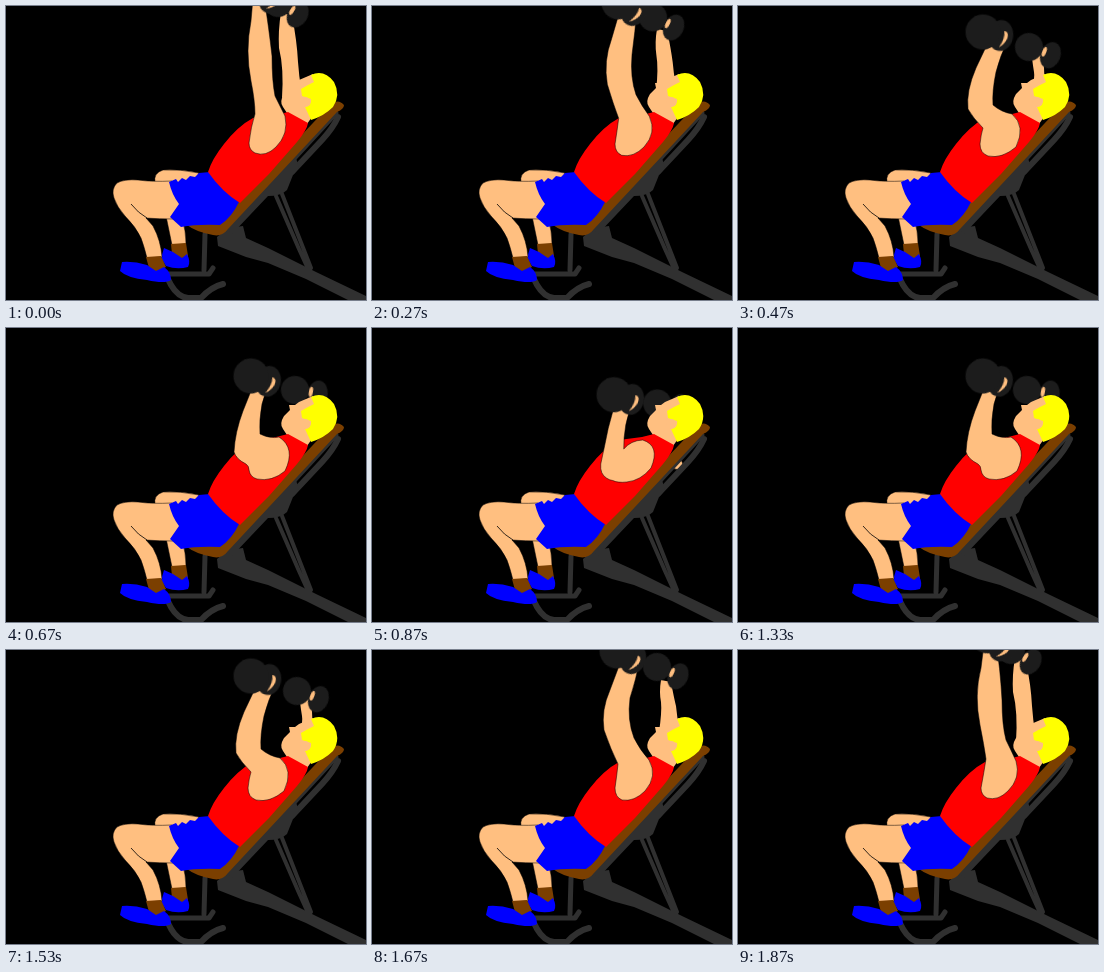
An HTML page without scripts that plays this animation: 360 px wide and 294 px high, repeating every 1.94 s.

```html
<!DOCTYPE html>
<html lang="en">
<head>
<meta charset="utf-8">
<title>Incline dumbbell press</title>
<style>
html, body { margin: 0; width: 100%; height: 100%; overflow: hidden; background: #000; }
svg { display: block; width: 100vw; height: 100vh; }
.skin { fill: #ffbf80; }
.blue { fill: #00f; }
.brown { fill: #7b3f00; }
.line { stroke: #000; stroke-width: .5; stroke-linejoin: round; }
.bar { fill: none; stroke: #303030; stroke-linecap: round; stroke-linejoin: round; }
.steel { fill: #303030; }

/* Poses: a top, b just below, c high, d middle, e low, f bottom */
.near.arm {
  --a: path("M243 137 Q245 120 249 108 Q249 95 245 75 Q239 45 245 15 L247 -8 L258 -8 Q262 15 266 50 Q266 75 269 90 Q273 98 279 110 Q283 128 270 141 Q260 151 249 147 Q243 144 243 137Z");
  --b: path("M243 138 Q246 122 248 109 Q246 95 242 75 Q236 45 243 18 L246 -6 L258 -6 Q262 15 264 50 Q264 75 268 90 Q272 98 278 111 Q283 128 270 141 Q260 151 249 148 Q243 145 243 138Z");
  --c: path("M243 138 Q245 124 246 114 Q239 100 232 80 Q229 60 238 40 L247 16 L268 8 Q264 30 258 48 Q255 70 262 88 Q268 100 277 110 Q286 126 273 141 Q262 152 250 150 Q243 147 243 138Z");
  --d: path("M242 138 Q243 128 245 122 Q235 112 230 103 Q228 85 238 62 L247 43 L270 34 Q262 50 258 66 Q254 85 255 99 Q263 106 274 108 Q288 120 278 141 Q264 153 250 150 Q242 147 242 138Z");
  --e: path("M243 142 Q243 138 240 136 Q230 131 228 124 Q229 104 237 83 L245 63 L265 54 Q259 64 256 76 Q253 92 254 106 Q264 111 273 109 Q290 120 279 143 Q266 154 251 151 Q244 149 243 142Z");
  --f: path("M240 156 Q236 157 233 155 Q227 151 229 140 Q234 122 236 106 L240 88 L260 82 Q255 92 253 104 Q251 116 251 126 Q257 113 270 113 Q288 117 279 139 Q270 152 256 155 Q246 157 240 156Z");
}
.far.arm {
  --a: path("M276 92 Q278 62 273 42 Q272 25 275 6 L286 10 Q291 35 292 56 Q293 70 295 82Z");
  --b: path("M278 92 Q280 62 275 42 Q274 25 277 8 L288 12 Q293 35 294 56 Q295 70 297 82Z");
  --c: path("M287 82 Q290 62 289 52 Q287 42 289 30 L299 32 Q302 48 304 56 Q305 66 307 78Z");
  --d: path("M294 82 Q297 72 296 66 Q295 60 294 52 L307 46 Q307 54 306 60 Q306 66 307 78Z");
  --e: path("M298 84 Q302 78 303 74 Q304 70 304 64 L309 62 Q309 66 309 70 Q309 74 309 80Z");
  --f: path("M285 90 Q288 86 288 84 Q286 80 286 78 L290 76 Q294 80 296 84 Q300 88 304 90Z");
}
.near.weight {
  --a: translate(252px, -18px) rotate(33deg);
  --b: translate(250px, -14px) rotate(33deg);
  --c: translate(245px, 1px) rotate(23deg);
  --d: translate(245px, 26px) rotate(8deg);
  --e: translate(245px, 48px) rotate(14deg);
  --f: translate(241px, 73px) rotate(11deg);
}
.far.weight {
  --a: translate(272px, -3px) rotate(31deg);
  --b: translate(273px, 0px) rotate(31deg);
  --c: translate(285px, 17px) rotate(24deg);
  --d: translate(291px, 41px) rotate(21deg);
  --e: translate(289px, 62px) rotate(10deg);
  --f: translate(284px, 80px) rotate(10deg);
}
.elbow {
  --a: translate(290px, 122px);
  --b: var(--a); --c: var(--a); --d: var(--a); --e: var(--a);
  --f: translate(310px, 141px);
}
.arm { d: var(--a); animation: bend 1940ms -5ms infinite; }
.weight, .elbow { transform: var(--a); animation: lift 1940ms -5ms infinite; }
.bell { fill: #1c1c1c; animation: shade 1940ms -5ms step-end infinite; }

/* Fifteen poses a second */
@keyframes bend {
  0% { d: var(--a); animation-timing-function: steps(2); }
  6.873% { d: var(--b); animation-timing-function: steps(3); }
  17.182% { d: var(--c); animation-timing-function: steps(2); }
  24.055% { d: var(--d); animation-timing-function: steps(3); }
  34.364% { d: var(--e); animation-timing-function: steps(4); }
  48.11% { d: var(--f); animation-timing-function: steps(2); }
  54.983% { d: var(--f); animation-timing-function: steps(4); }
  68.729% { d: var(--e); animation-timing-function: steps(3); }
  79.038% { d: var(--d); animation-timing-function: steps(2); }
  85.911% { d: var(--c); animation-timing-function: steps(3); }
  96.22% { d: var(--b); animation-timing-function: steps(1); }
  100% { d: var(--a); }
}
@keyframes lift {
  0% { transform: var(--a); animation-timing-function: steps(2); }
  6.873% { transform: var(--b); animation-timing-function: steps(3); }
  17.182% { transform: var(--c); animation-timing-function: steps(2); }
  24.055% { transform: var(--d); animation-timing-function: steps(3); }
  34.364% { transform: var(--e); animation-timing-function: steps(4); }
  48.11% { transform: var(--f); animation-timing-function: steps(2); }
  54.983% { transform: var(--f); animation-timing-function: steps(4); }
  68.729% { transform: var(--e); animation-timing-function: steps(3); }
  79.038% { transform: var(--d); animation-timing-function: steps(2); }
  85.911% { transform: var(--c); animation-timing-function: steps(3); }
  96.22% { transform: var(--b); animation-timing-function: steps(1); }
  100% { transform: var(--a); }
}
@keyframes shade {
  48.11% { fill: #303030; }
  58.42% { fill: #1c1c1c; }
}
</style>
</head>
<body>
<svg viewBox="0 0 360 294">
  <rect width="360" height="294"/>
  <ellipse class="skin elbow" rx="5.5" ry="5"/>

  <g id="bench">
    <path class="bar" stroke-width="4" d="M270 190 L293 243 L303 265 M276 188 L305 262 L303 265"/>
    <path class="bar" stroke-width="5" d="M199 228 L198 264 M160 268 H203 L207 262"/>
    <path class="bar" stroke-width="6" d="M160 269 L165 279 Q172 291 182 292 L195 292 Q205 281 217 278"/>
    <path class="steel" d="M211 231 L222 222 L237 220 L240 232 L262 242 L310 266 L360 290 V294 H342 L300 273 L262 257 L240 251 L212 240Z"/>
    <path class="bar" stroke-width="6" d="M332 111 Q327 122 316 134 L286 166"/>
    <path class="bar" stroke-width="5" d="M330 107 L222 224"/>
    <path class="steel" d="M290 152 L293 162 L287 169 L281 184 Q275 190 262 190 L226 228 L220 222Z"/>
    <path class="brown" d="M324 99 Q332 92 338 99 Q338 103 331 106 L222 223 Q216 231 207 229 Q190 226 181 219 L214 216 L234 194Z"/>
  </g>

  <g id="legs">
    <path class="skin line" d="M160 210 L166 239 L180 238 Q180 225 176 212Z"/>
    <path class="brown" d="M165 238 L180 237 L182 250 L176 254 L166 248Z"/>
    <path class="blue" d="M158 242 L167 246 L176 252 L181 248 Q185 256 182 261 Q171 264 160 260 L155 252Z"/>
    <path class="skin line" d="M149 177 Q147 167 157 164 Q174 163 193 167 L188 178Z"/>
    <path class="skin line" d="M166 175 Q146 176 132 174 Q118 173 111 177 Q105 183 108 192 Q111 201 119 210 Q130 221 135 232 Q138 240 141 252 L156 251 Q155 235 147 220 L140 212 Q153 213 168 213 L175 198Z"/>
    <path fill="none" stroke="#000" stroke-width=".8" d="M125 198 Q132 207 141 212"/>
    <path class="brown" d="M140 251 L155 250 L160 261 L151 266 L143 262Z"/>
    <path class="blue" d="M116 256 Q128 255 141 259 L150 265 L158 261 Q165 266 165 274 Q159 278 141 274 Q121 272 114 265Z"/>
    <path class="blue" d="M163 176 L170 173 L172 176 L176 172 L180 174 L184 170 L189 171 L193 167 L204 166 L233 196 Q226 211 214 219 Q191 218 175 221 L164 211 L173 198 Q166 189 163 176Z"/>
  </g>

  <path class="skin far arm"/>
  <g class="far weight">
    <path class="bar" stroke-width="7" d="M0 0 H22"/>
    <ellipse class="bell" cx="23" rx="10" ry="13.5"/>
    <circle class="bell" r="14"/>
    <ellipse class="skin" cx="16" cy="-1" rx="2" ry="5"/>
  </g>

  <g id="head">
    <path class="skin" d="M307 68 L293 74 L289 77 L283 77 L284 82 L278 88 Q273 96 277 101 L281 107 L301 118 L308 108 L322 90Z"/>
    <path fill="#ff0" d="M305 69 Q318 63 328 76 Q335 89 327 101 Q318 110 305 114 L299 101 Q306 100 305 93 L296 90 L295 83 L302 79 L308 76Z"/>
    <circle class="skin" cx="299" cy="96" r="5"/>
  </g>
  <path fill="#f00" d="M202 166 Q206 153 218 138 Q232 120 247 112 L270 109 L282 106 L302 117 Q301 124 291 136 L263 168 L234 197 Q216 186 202 166Z"/>

  <path class="skin line near arm"/>
  <g class="near weight">
    <path class="bar" stroke-width="8" d="M0 0 H20"/>
    <ellipse class="bell" cx="18" cy="1" rx="12.5" ry="15.5"/>
    <circle class="bell" r="17.5"/>
    <path class="skin" d="M21 -4 Q26 -4 25 3 Q23 9 18 13 Q23 3 21 -4Z"/>
  </g>
</svg>
</body>
</html>
```
